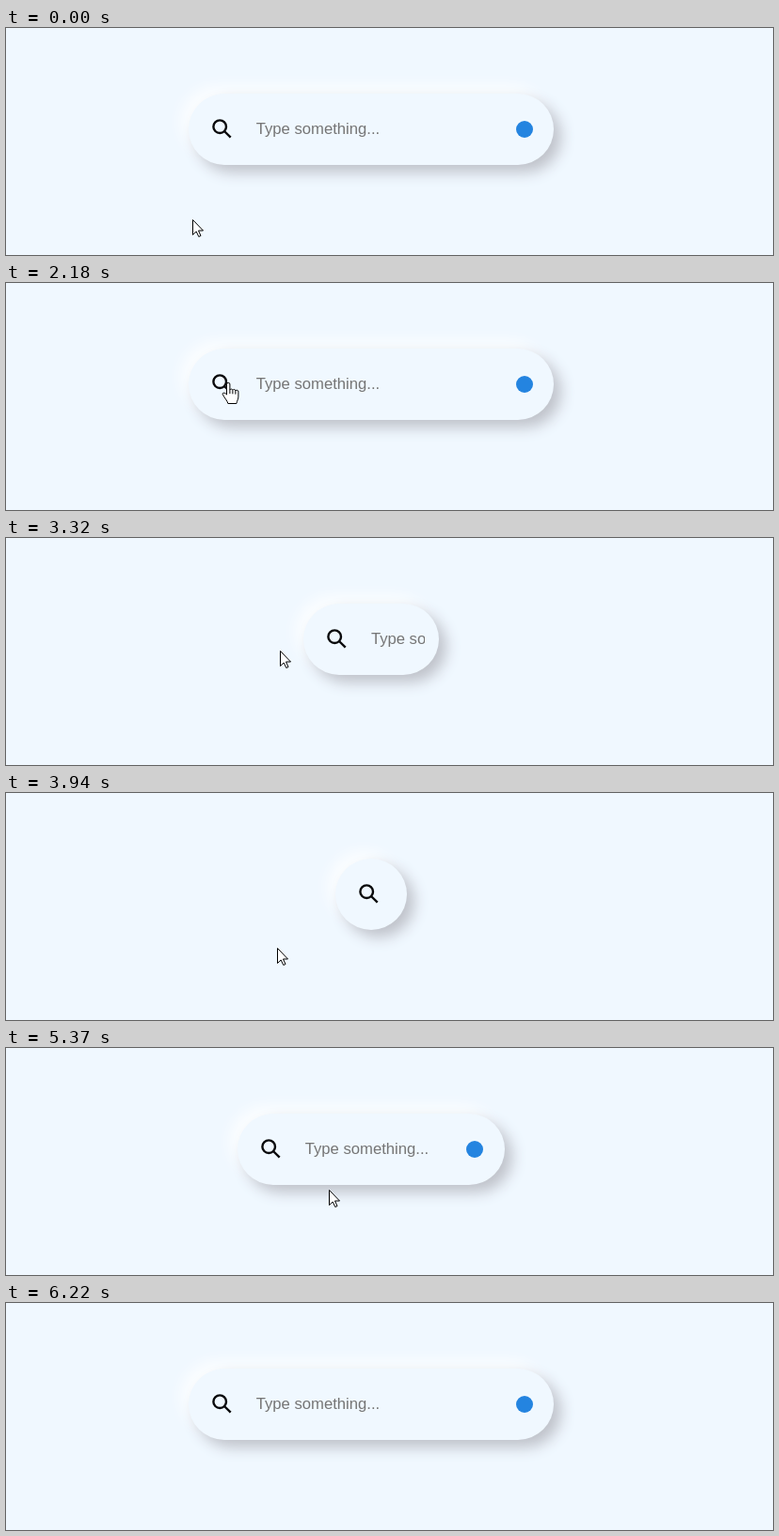
These frames come from a looping animation (815 by 242 pixels, 6.56 s). An HTML page:

```html
<!DOCTYPE html>
<html lang="en">
<head>
<meta charset="utf-8">
<title>Expanding search bar</title>
<style>
  html, body { margin: 0; width: 100%; height: 100%; overflow: hidden; background: #f0f8ff; }
  #pill {
    position: absolute; top: 70px; height: 76px; border-radius: 38px; overflow: hidden;
    background: #f0f8ff;
    box-shadow: 8px 8px 15px #bfc2ca, -8px -8px 16px rgba(255, 255, 255, .8);
  }
  #pill > * { position: absolute; }
  #icon { left: 0; top: 0; fill: none; stroke: #0a0a0c; stroke-width: 2.4; }
  #field { left: 71.7px; top: 24px; height: 28px; overflow: hidden; white-space: pre;
    font: 16.67px/27px "Liberation Sans", Arial, sans-serif; color: #757575; }
  #caret { left: 72px; top: 28px; width: 1px; height: 19px; background: #000; }
  #dot { top: 29px; width: 18px; height: 18px; border-radius: 50%; background: #2484e0; }
  #pointer { position: absolute; left: 0; top: 0; overflow: visible; }
  #pointer path { fill: #fff; stroke: #000; stroke-linejoin: round; }
  #pointer #beam { fill: none; }
</style>
</head>
<body>
<div id="pill">
  <svg id="icon" width="72" height="76">
    <circle cx="33.2" cy="35.2" r="6.8"/>
    <path d="M38 40L44.7 46.7"/>
  </svg>
  <div id="field">Type something...</div>
  <div id="caret"></div>
  <div id="dot"></div>
</div>
<svg id="pointer" width="1" height="1">
  <path id="arrow" d="M.5.5V16.5L4.2 13L6.8 18.5L9 17.5L6.5 12H11.5Z"/>
  <path id="hand" d="M-1.5 13V2a1.7 1.7 0 0 1 3.4 0v6a1.6 1.6 0 0 1 3 .3a1.6 1.6 0 0 1 3 .8a1.6 1.6 0 0 1 3 1v5c0 3-1.5 4.5-2 7.4h-9c-.5-3-4-6-5.7-10c-.3-2 2.5-1.8 4.3.5zM1.9 8v4M4.9 8.3v4M7.9 9.1v3.5"/>
  <path id="beam" d="M-3.5-7.5H-1.5L.5-6.5L2.5-7.5H4.5M.5-6.5V6.5M-3.5 7.5H-1.5L.5 6.5L2.5 7.5H4.5"/>
</svg>
<script>
const LOOP = 6560, CENTER = 388, OPEN = 388, CLOSED = 76;
const CLOSE_AT = 2671, OPEN_AT = 4846, SPAN = 1350;
const FOCUS_AT = 1230, BLUR_AT = 2570, BLINK = 490;
const $ = id => document.getElementById(id);

// Each pointer move glides from the last resting place
const home = { x: 198, y: 204 };
const moves = [
  { from: 500, to: 1050, x: 352, y: 110 },   // into the field
  { from: 1180, to: 1280, x: 361, y: 102 },  // click
  { from: 1720, to: 2310, x: 219, y: 106 },  // search icon
  { from: 2740, to: 3240, x: 291, y: 118 },  // away
  { from: 3240, to: 3940, x: 288, y: 165 },
  { from: 4030, to: 4550, x: 391, y: 112 },  // closed icon
  { from: 5040, to: 5400, x: 342, y: 152 },  // below the bar
  { from: 5850, to: 6250, x: 690, y: 260 }   // off the stage
];

const clamp = u => Math.min(1, Math.max(0, u));
const smooth = u => u * u * (3 - 2 * u);
const lerp = (a, b, u) => a + (b - a) * u;

// CSS "ease": cubic-bezier(.25, .1, .25, 1)
function ease(x) {
  x = clamp(x);
  const bez = (u, a, b) => 3 * u * (1 - u) ** 2 * a + 3 * u * u * (1 - u) * b + u ** 3;
  let lo = 0, hi = 1;
  for (let i = 0; i < 24; i++) {
    const mid = (lo + hi) / 2;
    if (bez(mid, .25, .25) < x) lo = mid; else hi = mid;
  }
  return bez(hi, .1, 1);
}

function pointerAt(t) {
  let { x, y } = home;
  for (const m of moves) {
    const u = smooth(clamp((t - m.from) / (m.to - m.from)));
    x = lerp(x, m.x, u);
    y = lerp(y, m.y, u);
  }
  return [Math.round(x), Math.round(y)];
}

function shapeAt(x, y, left, width) {
  const dx = x - left;
  if (y < 90 || y > 125 || dx < 12 || dx > width - 12) return "arrow";
  return dx < 72 ? "hand" : dx < width - 57 ? "beam" : "arrow";
}

const show = (id, on) => $(id).style.display = on ? "" : "none";

function draw(t) {
  const closed = ease((t - CLOSE_AT) / SPAN) - ease((t - OPEN_AT) / SPAN);
  const width = lerp(OPEN, CLOSED, closed), left = CENTER - width / 2;
  const active = t < CLOSE_AT || t >= OPEN_AT;
  const blink = Math.floor((t - FOCUS_AT) / BLINK);

  $("pill").style.left = left + "px";
  $("pill").style.width = width + "px";
  $("field").style.width = Math.max(0, width - 72 - (active ? 57 : 14)) + "px";
  $("dot").style.left = Math.max(97.5, width - 31.5) - 9 + "px";
  show("dot", active);
  show("caret", t >= FOCUS_AT && t < BLUR_AT && blink % 2 === 0);

  const [x, y] = pointerAt(t), shape = shapeAt(x, y, left, width);
  $("pointer").style.transform = `translate(${x}px, ${y}px)`;
  for (const id of ["arrow", "hand", "beam"]) show(id, id === shape);
}

const start = performance.now();
function loop() {
  draw((performance.now() - start) % LOOP);
  requestAnimationFrame(loop);
}
loop();
</script>
</body>
</html>
```
